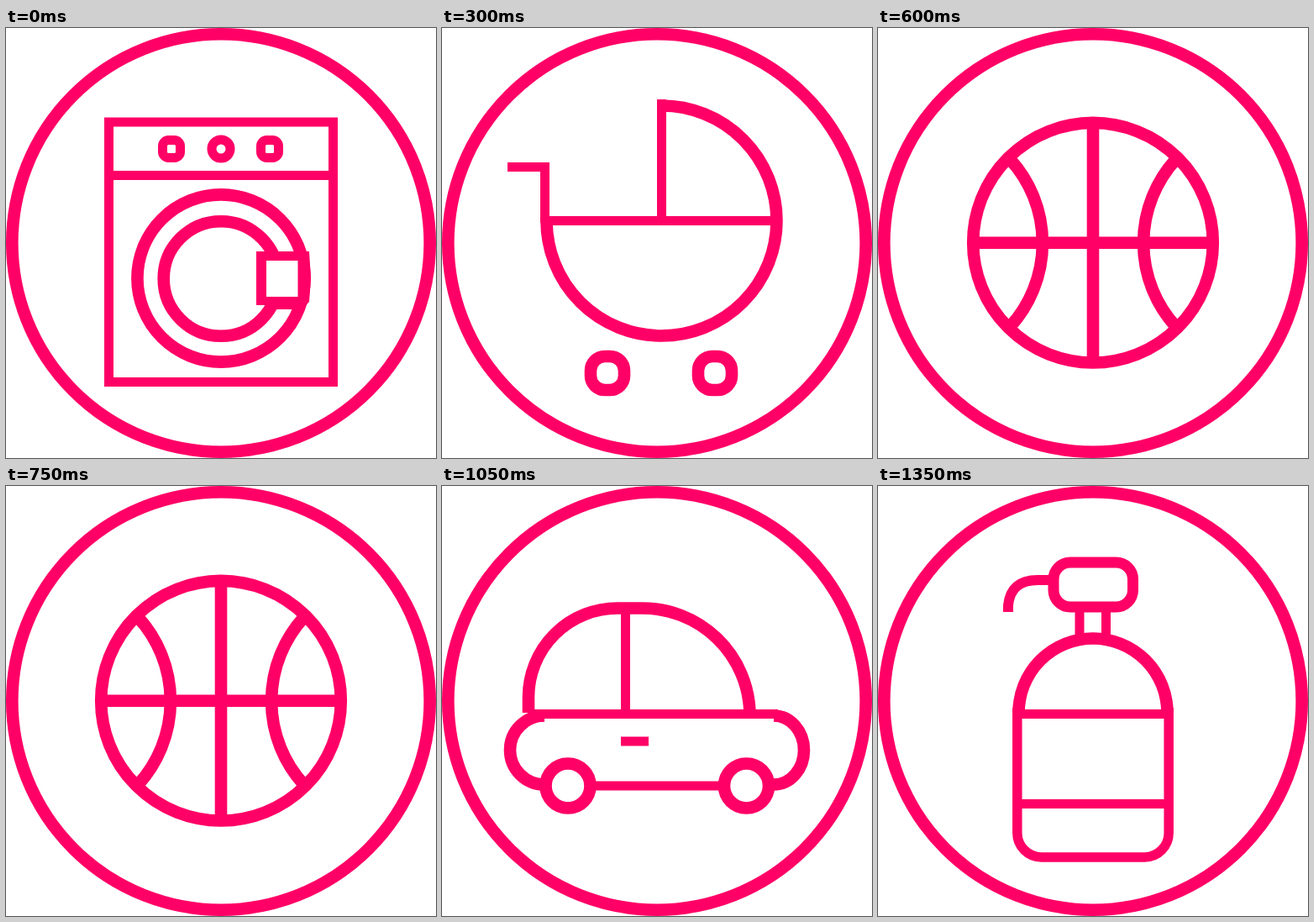
An HTML page without scripts for the animation above (1.5 s loop, 512 by 512 pixels).

```html
<!DOCTYPE html>
<html lang="en">
<head>
<meta charset="utf-8">
<title>Category icons</title>
<style>
  html, body { margin: 0; width: 100%; height: 100%; overflow: hidden; background: #fff; }
  svg { display: block; width: 100%; height: 100%; fill: none; stroke: #f06; stroke-width: 11; }
  .thick { stroke-width: 14.6; }
  .solid { fill: #f06; stroke: none; fill-rule: evenodd; }
  .blank { fill: #fff; stroke: none; }
  .white { fill: #fff; }

  /* Icons swap with hard cuts; --at is the start time in the loop. */
  .icon { visibility: hidden; animation: short 1.5s step-end calc(var(--at) - 1.5s) infinite; }
  .long { animation-name: long; }
  @keyframes short { 0% { visibility: visible; } 10%, 100% { visibility: hidden; } }
  @keyframes long { 0% { visibility: visible; } 20%, 100% { visibility: hidden; } }
</style>
</head>
<body>
<svg viewBox="0 0 512 512">
  <circle class="thick" cx="256" cy="256" r="248.7"/>

  <!-- washing machine -->
  <g class="icon" style="--at: 0s">
    <path d="M122.5 112H389.5V421.5H122.5ZM122.5 175.5H389.5"/>
    <rect x="186.5" y="133.5" width="21" height="21" rx="7"/>
    <circle cx="256" cy="144" r="11"/>
    <rect x="303.5" y="133.5" width="21" height="21" rx="7"/>
    <g class="thick">
      <circle cx="256" cy="298" r="99.6"/>
      <circle cx="256" cy="298.5" r="68.3"/>
    </g>
    <path class="solid" d="M298 266H361L363 298 361 326 352 335H310V330H298Z"/>
    <path class="blank" d="M310 277H347.5V320H310Z"/>
  </g>

  <!-- pram -->
  <g class="icon long" style="--at: .15s">
    <path d="M78 165.5H122.5V232M122 229.5H400M261.5 85V230"/>
    <g class="thick">
      <path d="M258 92.5H262A137 137 0 0 1 398.5 229.5A137 137 0 0 1 124.5 229.5"/>
      <rect x="177" y="391" width="40" height="40" rx="17"/>
      <rect x="305" y="391" width="40" height="40" rx="17"/>
    </g>
  </g>

  <!-- handbag -->
  <g class="icon" style="--at: .45s">
    <g class="thick">
      <path d="M177.5 194V128A78.5 78.5 0 0 1 334.5 128V194"/>
      <path d="M158 200V204.5A98 98 0 0 0 354 204.5V200"/>
    </g>
    <path class="solid" d="M145 192H367L384 427H128ZM160 203L143.5 416H368.5L352 203Z"/>
    <path class="solid" d="M245 277H267V331H245Z"/>
  </g>

  <!-- ball -->
  <g class="icon long thick" style="--at: .6s">
    <circle cx="256" cy="255.7" r="142.8"/>
    <path d="M256 112V399M113 255.7H399"/>
    <path d="M157 156A148 148 0 0 1 157 356M355 156A148 148 0 0 0 355 356"/>
  </g>

  <!-- car -->
  <g class="icon long" style="--at: .9s">
    <path d="M103 271.5H400M218.5 146V271M180 357H332M213 304H246"/>
    <g class="thick">
      <path d="M103 270V251A106 106 0 0 1 209 145.5H238A128 128 0 0 1 366.500 270"/>
      <path d="M122 273.500A41 41 0 0 0 122 355.500M395 273.500A36 41 0 0 1 395 355.500"/>
      <circle class="white" cx="150" cy="357" r="26.5"/>
      <circle class="white" cx="362.500" cy="357" r="26.5"/>
    </g>
  </g>

  <!-- sofa -->
  <g class="icon" style="--at: 1.2s">
    <path class="solid" d="M85 342V216Q85 202 99 202H413Q427 202 427 216V342H406V384H384V342H128V384H106V342Z"/>
    <path class="blank" d="M96 330V227Q96 214 112 214T128 227V299H384V227Q384 214 400 214T416 227V330Z"/>
    <path class="solid" d="M128 299V163Q128 149 142 149H244Q252 149 256 154Q260 149 268 149H370Q384 149 384 163V299Z"/>
    <g class="blank">
      <path id="seat" d="M139 245V178Q141 160 158 160H231Q247 161 248 178V245ZM139 288Q140 260 160 259H231Q247 261 248 288Z"/>
      <use href="#seat" x="125"/>
    </g>
  </g>

  <!-- soap dispenser -->
  <g class="icon" style="--at: 1.35s">
    <path d="M155 150V142Q158 112 190 112H208" stroke-width="12"/>
    <rect x="209" y="91" width="94.500" height="53" rx="20" stroke-width="13"/>
    <path d="M240 147V186M271.500 147V186M165.500 271.500H346.500M165.500 378.500H346.500"/>
    <path class="thick" d="M167.500 270A88.500 88.500 0 0 1 344.500 270"/>
    <path d="M165.800 264V413A29 29 0 0 0 194.500 442H317.500A29 29 0 0 0 346.200 413V264" stroke-width="11.500"/>
  </g>
</svg>
</body>
</html>
```
